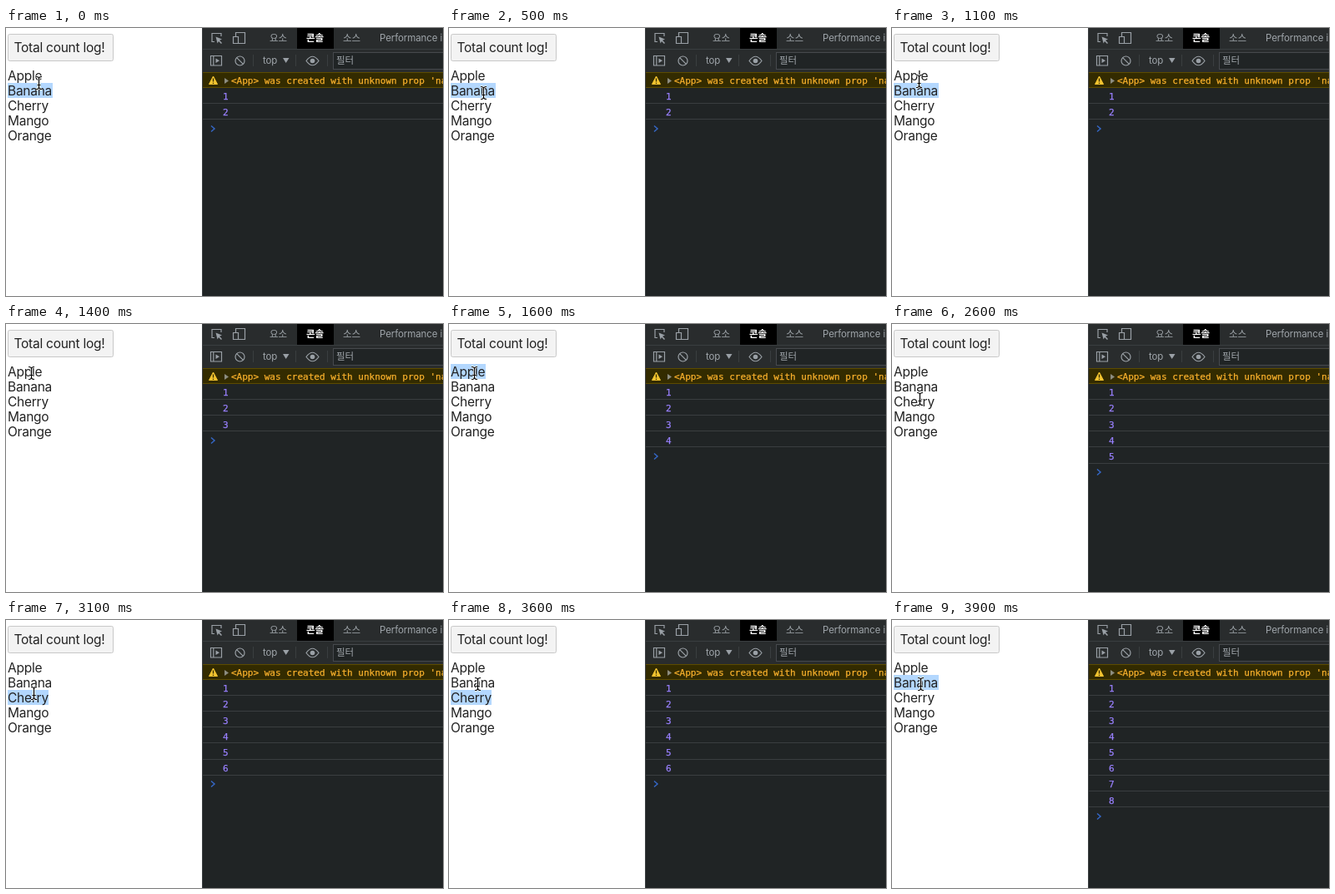
These frames come from a looping animation (524x322 px, 4000 ms). An HTML page:

```html
<!DOCTYPE html>
<html lang="ko">
<head>
<meta charset="utf-8">
<title>Click log</title>
<style>
  html, body { margin: 0; width: 100%; height: 100%; overflow: hidden; background: #fff; }
  svg { display: block; }
  text { white-space: pre; }
  .page { font: 15.5px Inter, "Liberation Sans", sans-serif; letter-spacing: -.25px; fill: #222; }
  .ui { font: 11.5px Inter, "Noto Sans CJK KR", "Noto Sans CJK", sans-serif; letter-spacing: -.1px; fill: #9fa5aa; }
  .ui .active { font-weight: bold; fill: #fff; }
  .mono { font: 11px "DejaVu Sans Mono", monospace; }
  .mono text, text.mono { stroke: currentColor; stroke-width: .25px; fill: currentColor; }
  .icon { fill: none; stroke: #9aa0a6; stroke-width: 1.2; }
  .icon .solid { fill: #9aa0a6; stroke: none; }
  .rule { stroke: #3a3e40; }
</style>
</head>
<body>
<svg width="524" height="322" viewBox="0 0 524 322">
  <defs>
    <path id="beam" d="M-3.5 -7.5Q0 -7.5 0 -5Q0 -7.5 3.5 -7.5M0 -5V5M-3.5 7.5Q0 7.5 0 5Q0 7.5 3.5 7.5M-2 2.5H2"/>
  </defs>

  <g class="page">
    <rect x="2.5" y="7.5" width="126" height="32" rx="2" fill="#f3f3f3" stroke="#c8c8c8"/>
    <text x="9.5" y="29">Total count log!</text>
    <rect id="mark" x="2" height="18" fill="#b3d7fe"/>
    <g id="fruits"></g>
  </g>

  <rect x="235" width="289" height="322" fill="#202425"/>
  <rect x="236" width="288" height="53" fill="#292c2d"/>
  <rect x="349" width="44" height="25" fill="#000"/>
  <path class="rule" d="M235.5 0V322M236 25.5H524M296.5 32V46M347.5 32V46M385.5 32V46"/>

  <g class="icon">
    <path d="M250 16.5H247V6.5H258V10"/>
    <path class="solid" d="M251.5 10.5L259 13.5L256 14.8L259 18L258 19L255 16L253.6 18.5Z"/>
    <path d="M275.5 10V5.5H286.5V18.5H279M272.5 10.5H278.5V18.5H272.5Z"/>
    <path d="M245.5 33.5H258.5V45H245.5ZM248.8 33.5V45"/>
    <path class="solid" d="M251.5 36.5L256 39.3L251.5 42Z"/>
    <circle cx="280.5" cy="39.5" r="5.5"/>
    <path d="M276.6 35.6L284.4 43.4"/>
    <path d="M360 39.5Q367.5 29 375 39.5Q367.5 50 360 39.5Z"/>
    <circle class="solid" cx="367.5" cy="39.5" r="2.8"/>
    <path class="solid" d="M332 36H339.5L335.7 42Z"/>
  </g>
  <g class="ui">
    <text x="316" y="16">요소</text>
    <text x="360" y="16" class="active">콘솔</text>
    <text x="404" y="16">소스</text>
    <text x="448" y="16">Performance insights</text>
    <text x="308" y="43">top</text>
    <rect x="392.5" y="29.5" width="140" height="20" fill="#202425" stroke="#46494d"/>
    <text x="396" y="43">필터</text>
  </g>

  <rect x="236" y="53" width="288" height="19" fill="#332b00"/>
  <path d="M236 53.5H524M236 71.5H524" stroke="#5c4b00"/>
  <path d="M248.5 58L253.5 67.5H243.5Z" fill="#f4c430" stroke="#f4c430" stroke-linejoin="round"/>
  <path d="M248.5 60.5V64.5M248.5 65.7V67" stroke="#332b00" stroke-width="1.3"/>
  <path d="M262 60L267 63.5L262 67Z" fill="#8c8c80"/>
  <text class="mono" x="270" y="67" color="#f8b02c">&lt;App&gt; was created with unknown prop 'name'</text>

  <g id="logs" class="mono" color="#9980ff"></g>
  <path id="prompt" d="M246 -3.5L250 0L246 3.5" fill="none" stroke="#3567c5" stroke-width="1.5"/>

  <g id="cursor" fill="none">
    <use href="#beam" stroke="#fff" stroke-width="2.6"/>
    <use href="#beam" stroke="#000" stroke-width="1.2"/>
  </g>
</svg>
<script>
const $ = id => document.getElementById(id);
const fruits = ['Apple', 'Banana', 'Cherry', 'Mango', 'Orange'];
const markWidths = [42, 54, 49];
const LOOP = 4000, STEP = 100, ROW = 19.2;

// [time, x, y]
const path = [[0, 39, 66], [500, 41, 78], [1100, 32, 64], [1400, 30, 59], [1800, 30, 59],
  [2300, 32, 93], [2700, 33, 89], [3100, 33, 88], [3600, 34, 77], [LOOP, 34, 77]];
// [time, logged count, selected fruit or -1]
const states = [[0, 2, 1], [1400, 3, -1], [1500, 4, 0], [2600, 5, -1], [2700, 6, 2],
  [3700, 7, -1], [3800, 8, 1]];

$('fruits').innerHTML = fruits.map((name, i) => `<text x="2" y="${63 + 18 * i}">${name}</text>`).join('');
$('logs').innerHTML = Array.from({ length: 8 }, (_, i) => {
  const line = Math.floor(72 + ROW * (i + 1)) - .5;
  return `<g><text x="260" y="${Math.round(86.2 + ROW * i)}">${i + 1}</text>
    <path class="rule" d="M236 ${line}H524"/></g>`;
}).join('');

function cursorAt(t) {
  const i = path.findIndex(p => p[0] > t);
  const [t0, x0, y0] = path[i - 1], [t1, x1, y1] = path[i];
  const k = (t - t0) / (t1 - t0);
  return [x0 + (x1 - x0) * k, y0 + (y1 - y0) * k];
}

function draw(now) {
  const t = Math.floor(now % LOOP / STEP) * STEP;
  const [, count, selected] = states.findLast(s => s[0] <= t);
  const [x, y] = cursorAt(t).map(Math.round);
  $('cursor').setAttribute('transform', `translate(${x + .5} ${y})`);
  $('mark').setAttribute('y', 48 + 18 * selected);
  $('mark').setAttribute('width', markWidths[selected] ?? 0);
  [...$('logs').children].forEach((row, i) => row.setAttribute('display', i < count ? 'inline' : 'none'));
  $('prompt').setAttribute('transform', `translate(0 ${Math.round(82.2 + ROW * count)})`);
}

const start = performance.now();
(function tick() {
  draw(performance.now() - start);
  requestAnimationFrame(tick);
})();
</script>
</body>
</html>
```
